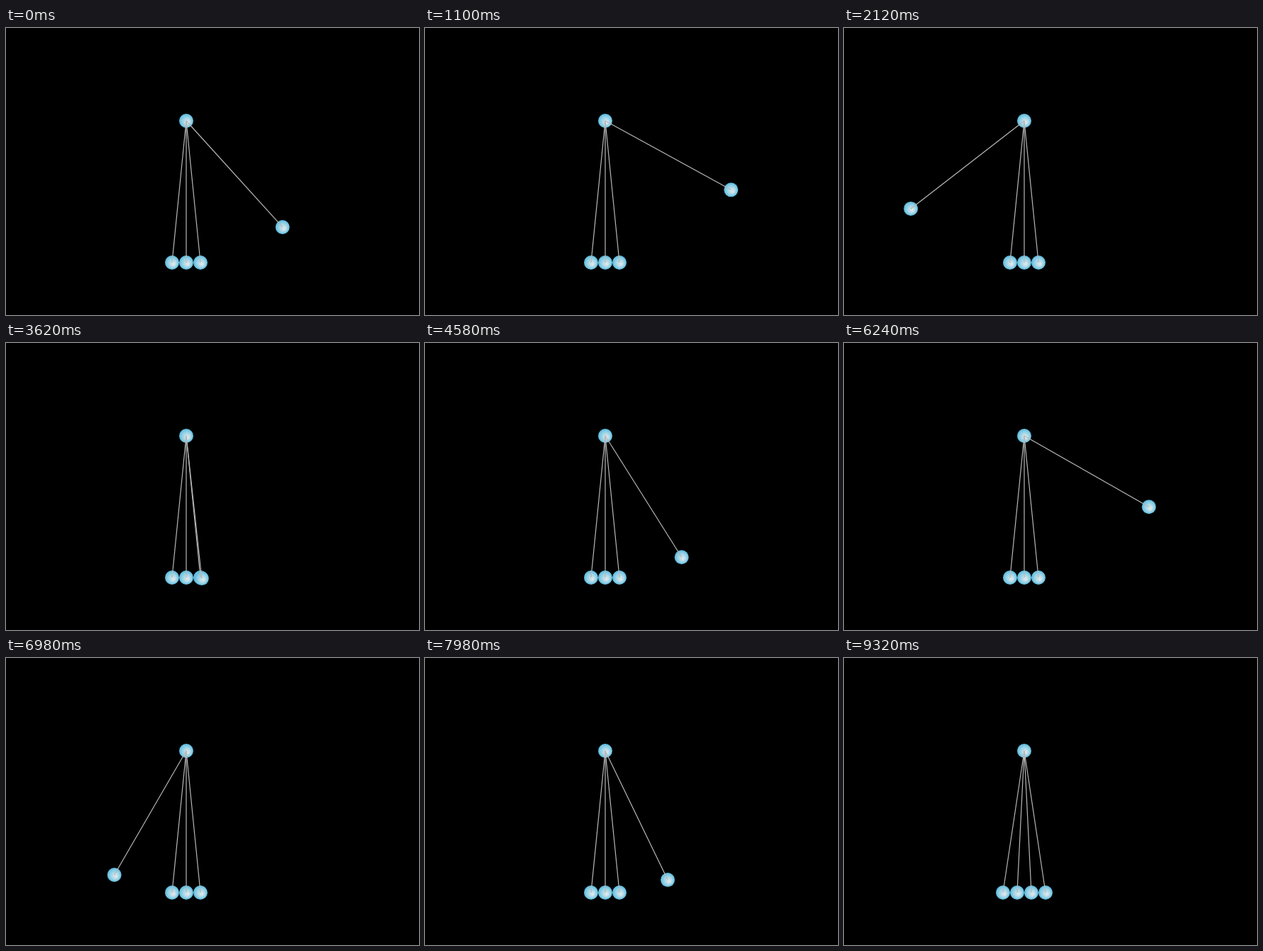
Animation of 582x405 px, one loop 9.34 s. Source, as an HTML page with a canvas:

```html
<!DOCTYPE html>
<html lang="en">
<head>
<meta charset="utf-8">
<title>Swinging balls</title>
<style>
  html, body { margin: 0; width: 100%; height: 100%; overflow: hidden; background: #000; }
  canvas { display: block; }
</style>
</head>
<body>
<canvas id="stage" width="582" height="405"></canvas>
<script>
const ctx = document.getElementById('stage').getContext('2d');
const LOOP = 9340, FIRST_HOLD = 100, STEP = 20;
const PIVOT = { x: 254, y: 131 };
const RADIUS = 10, DROP = 200;
const SWING_LENGTH = Math.hypot(DROP, 30);
const REST_STEP = 457;
const MIN_ANGLE = 6.2;

// Key points of the pace: [step, half swings completed].
const PACE = [
  [0, 0.183], [102, 1.237], [141, 1.793], [177, 2.974],
  [271, 5.28], [345, 7.816], [395, 8.82], [REST_STEP, 11]
];

function phaseAt(step) {
  const i = Math.max(1, PACE.findIndex(([s]) => s >= step));
  const [s0, p0] = PACE[i - 1], [s1, p1] = PACE[i];
  return p0 + (p1 - p0) * (step - s0) / (s1 - s0);
}

// Each half swing peaks lower than the one before, on alternating sides.
const peakOf = swing => 77.5 * (1 - (swing / 13) ** 2);

function angleAt(step) {
  const phase = phaseAt(step), swing = Math.floor(phase);
  const size = Math.max(MIN_ANGLE, peakOf(swing) * Math.sin(Math.PI * (phase - swing)));
  return (swing % 2 ? -size : size) * Math.PI / 180;
}

function drawBall({ x, y }) {
  const shade = ctx.createRadialGradient(x + 2.5, y + 2.5, 0, x, y, RADIUS);
  shade.addColorStop(0, '#e4eaec');
  shade.addColorStop(0.3, '#c5dfe8');
  shade.addColorStop(0.7, '#8bcfe6');
  shade.addColorStop(1, '#58b9dc');
  ctx.fillStyle = shade;
  ctx.beginPath();
  ctx.arc(x, y, RADIUS, 0, Math.PI * 2);
  ctx.fill();
}

function drawString({ x, y }) {
  ctx.strokeStyle = '#b8b8b8';
  ctx.lineWidth = 1.2;
  ctx.beginPath();
  ctx.moveTo(PIVOT.x, PIVOT.y);
  ctx.lineTo(x, y);
  ctx.stroke();
}

function hanging(offsets) {
  return offsets.map(dx => ({ x: PIVOT.x + dx, y: PIVOT.y + DROP }));
}

function ballsAt(step) {
  if (step >= REST_STEP) return hanging([-30, -10, 10, 30]);
  const angle = angleAt(step);
  return [...hanging([-20, 0, 20]), {
    x: PIVOT.x + SWING_LENGTH * Math.sin(angle),
    y: PIVOT.y + SWING_LENGTH * Math.cos(angle)
  }];
}

function draw(time) {
  const step = time < FIRST_HOLD ? 0 : 1 + Math.floor((time - FIRST_HOLD) / STEP);
  const balls = ballsAt(step);
  ctx.fillStyle = '#000';
  ctx.fillRect(0, 0, 582, 405);
  drawBall(PIVOT);
  balls.forEach(drawBall);
  balls.forEach(drawString);
}

const start = performance.now();
function tick() {
  draw((performance.now() - start) % LOOP);
  requestAnimationFrame(tick);
}
tick();
</script>
</body>
</html>
```
